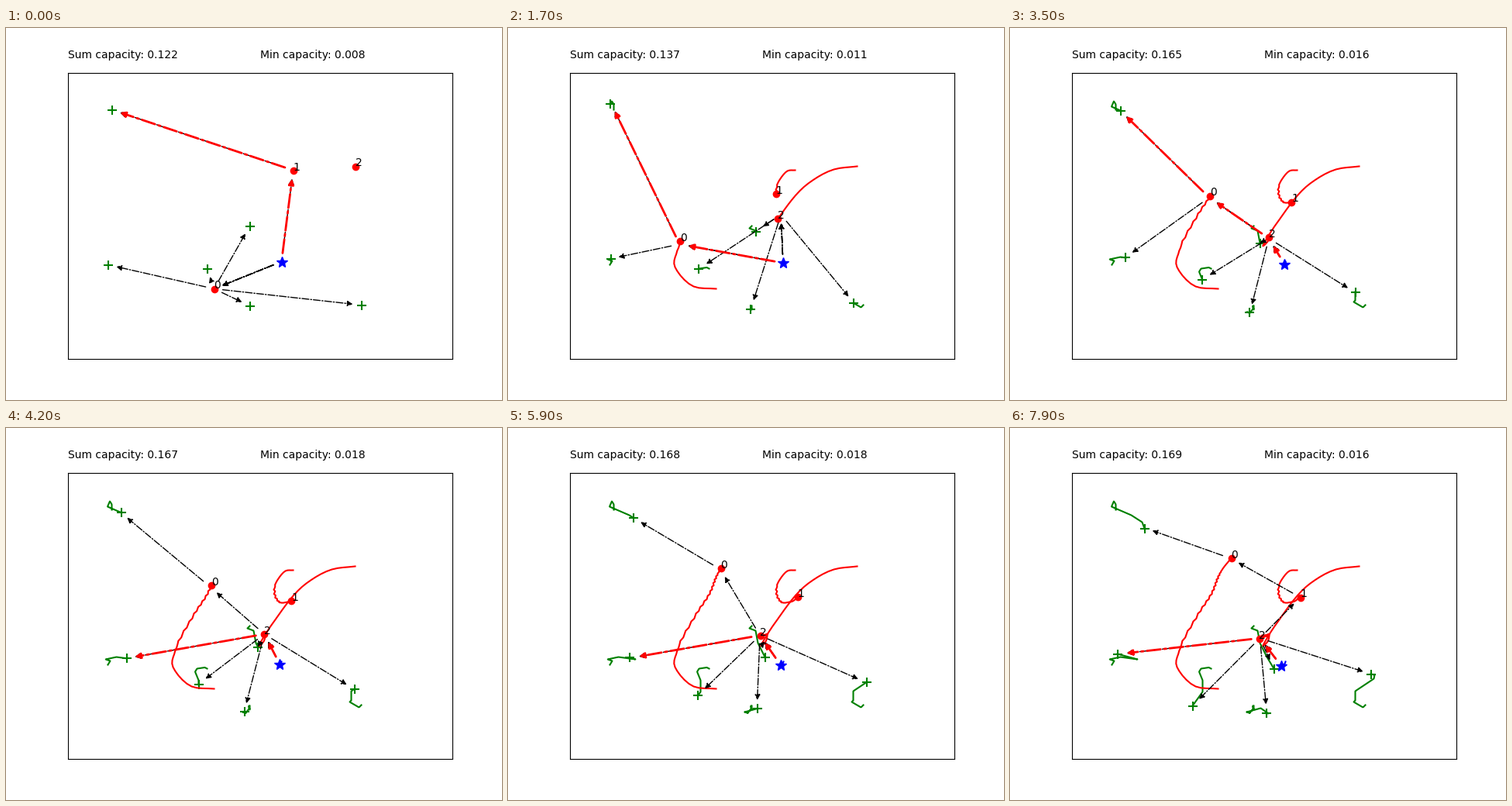
A matplotlib script that plays this animation: 640 px wide and 480 px high, repeating every 8 s.

```python
import numpy as np
import matplotlib.pyplot as plt
from matplotlib.animation import FuncAnimation
from matplotlib.patches import FancyArrowPatch

FRAMES, INTERVAL = 80, 100
STEPS = np.arange(FRAMES)


def walk(*corners):
    """Straight legs between corners at one constant speed."""
    p = np.array(corners, float)
    dist = np.r_[0, np.cumsum(np.hypot(*np.diff(p, axis=0).T))]
    at = np.linspace(0, dist[-1], FRAMES)
    return np.column_stack([np.interp(at, dist, c) for c in p.T])


def glide(*keys, shake=(0, 0)):
    """Cubic Hermite flight through (step, x, y), with a shake that fades out."""
    keys = np.array(keys, float)
    t, p = keys[:, 0], keys[:, 1:]
    m = np.gradient(p, t, axis=0)
    i = np.clip(np.searchsorted(t, STEPS, "right") - 1, 0, len(t) - 2)
    h = (t[i + 1] - t[i])[:, None]
    u = (STEPS - t[i])[:, None] / h
    path = ((1 + 2 * u) * (1 - u) ** 2 * p[i] + u * (1 - u) ** 2 * h * m[i]
            + u * u * (3 - 2 * u) * p[i + 1] + u * u * (u - 1) * h * m[i + 1])
    start, stop = shake
    fade = np.clip((STEPS - start) / 4, 0, 1) * np.clip((stop - STEPS) / 10, 0, 1)
    path[:, 0] += fade * np.sin(2.1 * STEPS + 0.9)
    return path


def level(*keys):
    return np.interp(STEPS, *zip(*keys))


# Stage pixels, y downwards.
users = [
    walk((137, 105), (137, 98), (134.5, 94), (131.5, 101), (157, 112), (171, 121), (174, 129)),
    walk((132, 305), (135, 300), (129, 298), (143, 295), (165, 298), (139, 291)),
    walk((260, 310), (257, 308.5), (247, 310), (244.5, 314), (249, 325), (249, 340), (236, 358)),
    walk((315, 255), (312, 258), (320, 261), (323, 277), (332, 295), (341, 310)),
    walk((315, 358), (315, 363), (314, 358), (314, 362), (310, 367), (306, 366),
         (310, 367), (306, 366), (324, 361), (334, 368), (331, 367)),
    walk((459, 357), (456, 360), (444, 353), (446, 351), (446, 339), (470, 323),
         (471, 318), (466, 317)),
]
relays = [
    glide((0, 269, 336), (4, 240, 333), (9, 216, 308), (14, 219, 287), (25, 242, 242),
          (35, 259, 216), (49, 269, 192), (79, 286, 167), shake=(13, 58)),
    glide((0, 371, 183), (4, 361, 184), (9, 350, 197), (16, 347, 212), (25, 353, 224),
          (35, 364, 224), (59, 374, 217), (79, 375, 218), shake=(10, 36)),
    glide((0, 451, 178), (4, 421, 182), (9, 388, 200), (18, 345, 251), (25, 327, 280),
          (31, 333, 275), (38, 335, 266), (49, 328, 269), (59, 326, 267),
          (66, 333, 267), (79, 322, 271)),
]
base = walk((356, 301), (355, 304), (350, 306))

sum_cap = level((0, .122), (9, .088), (25, .186), (35, .165), (49, .169), (59, .168), (79, .169))
min_cap = level((0, .008), (25, .012), (35, .016), (49, .019), (79, .016))


def routes(k):
    """Relay chain from the base to each user."""
    first = "1" if k < 17 else "0" if k < 30 else "20" if k < 70 else "210"
    second = "0" if k < 20 else "20" if k < 42 else "2"
    return [first, second] + ["0" if k < handover else "2" for handover in (14, 5, 12, 6)]


fig, ax = plt.subplots(figsize=(6.4, 4.8), dpi=100)
ax.set(xlim=(80.5, 576.5), ylim=(426.7, 57.1), xticks=[], yticks=[])
sum_text = ax.text(0, 1.05, "", transform=ax.transAxes)
min_text = ax.text(0.5, 1.05, "", transform=ax.transAxes)


def mover(path, color, marker, size, edge=1.0):
    trail, = ax.plot([], [], color=color, lw=1.5)
    head, = ax.plot([], [], color=color, marker=marker, ms=size, mew=edge, ls="")
    return path, trail, head


movers = [mover(p, "green", "+", 8.9, 1.5) for p in users]
movers += [mover(p, "red", "o", 6) for p in relays]
movers.append(mover(base, "blue", "*", 10))
labels = [ax.text(0, 0, str(i), zorder=4) for i in range(len(relays))]
arrows = []


def draw_link(user, chain, k, color, lw):
    stops = [base[k], *(relays[int(c)][k] for c in chain), users[user][k]]
    for a, b in zip(stops, stops[1:]):
        arrow = FancyArrowPatch(tuple(a), tuple(b), arrowstyle="-|>", mutation_scale=10,
                                shrinkA=8, shrinkB=8, color=color, lw=lw, ls="-.", zorder=3)
        arrows.append(ax.add_patch(arrow))


def update(k):
    while arrows:
        arrows.pop().remove()
    for path, trail, head in movers:
        trail.set_data(*path[:k + 1].T)
        head.set_data(*path[k:k + 1].T)
    for label, path in zip(labels, relays):
        label.set_position(path[k])

    # Links lag one step behind the nodes; the weakest one is red.
    lag = max(k - 1, 0)
    chains = routes(k)
    for user, chain in enumerate(chains):
        draw_link(user, chain, lag, "black", 1)
    weakest = 0 if k < 42 else 1
    draw_link(weakest, chains[weakest], lag, "red", 2)

    sum_text.set_text(f"Sum capacity: {sum_cap[k]:.3f}")
    min_text.set_text(f"Min capacity: {min_cap[k]:.3f}")
    return []


anim = FuncAnimation(fig, update, frames=FRAMES, interval=INTERVAL, repeat=True, repeat_delay=0)
plt.show()
```
